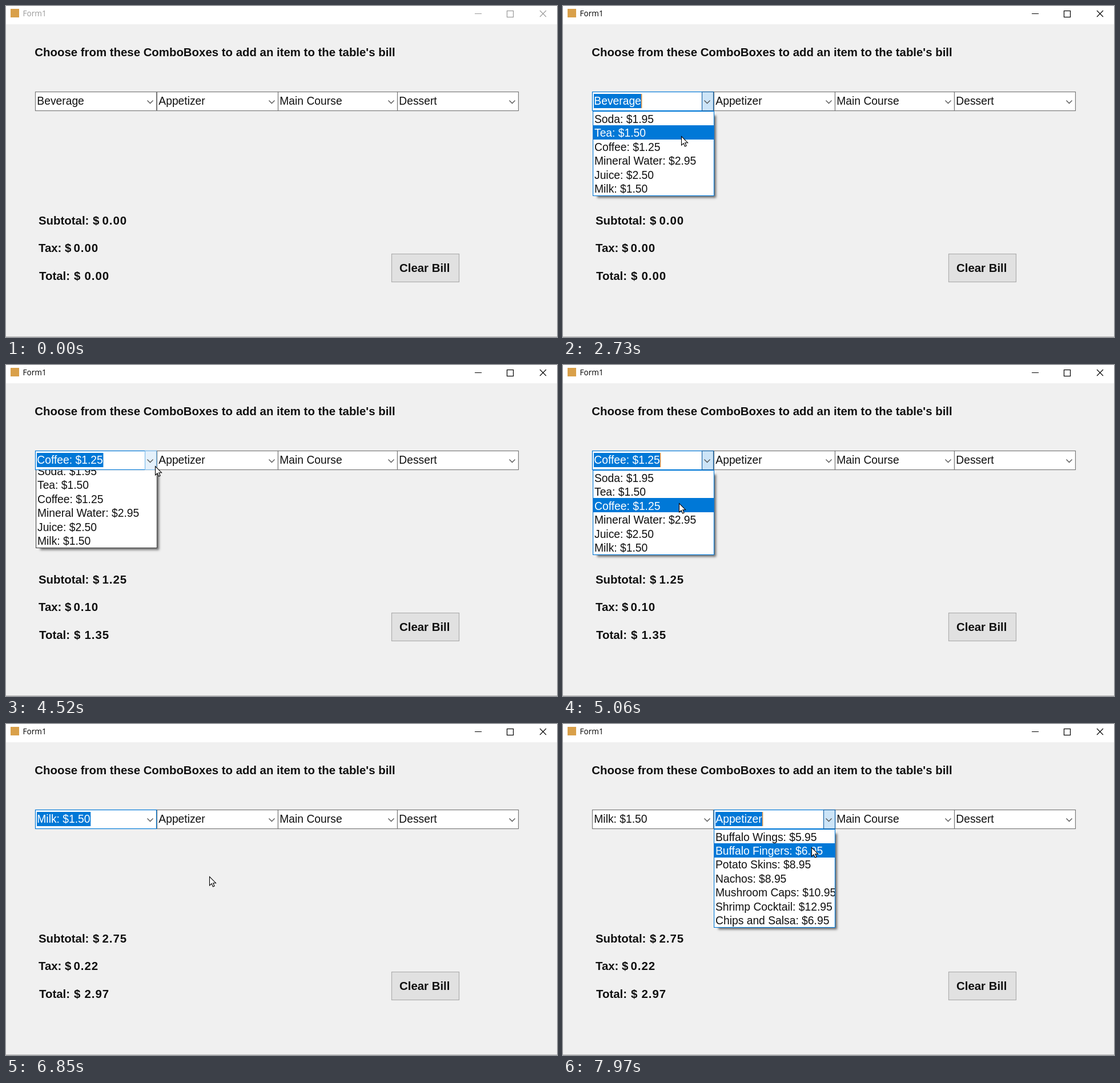
Animation, 965 px wide and 580 px high, one loop 8 s. Source, as an HTML page with a canvas:

```html
<!DOCTYPE html>
<html lang="en">
<head>
<meta charset="utf-8">
<title>Form1</title>
<style>
html, body { margin: 0; width: 100%; height: 100%; overflow: hidden; background: #f0f0f0; }
canvas { display: block; }
</style>
</head>
<body>
<canvas id="stage" width="965" height="580"></canvas>
<script>
const ctx = document.getElementById('stage').getContext('2d');
const LOOP = 8000, STEP = 70, TAX = 0.08;
const BLUE = '#0078d7', DARK = '#2b2b2b', GREY = '#7a7a7a', INK = '#101010';
const SANS = '"Liberation Sans", Arial, sans-serif';
const PLAIN = '19.3px ' + SANS, BOLD = 'bold 20.4px ' + SANS;
const TOP = 150, BOTTOM = 184, ROW = 24.4, LIST_TOP = 184;

const combos = [
  { x: 51, r: 264, label: 'Beverage', listX: 52,
    items: ['Soda: $1.95', 'Tea: $1.50', 'Coffee: $1.25', 'Mineral Water: $2.95', 'Juice: $2.50', 'Milk: $1.50'] },
  { x: 264, r: 477, label: 'Appetizer', listX: 264,
    items: ['Buffalo Wings: $5.95', 'Buffalo Fingers: $6.95', 'Potato Skins: $8.95', 'Nachos: $8.95',
      'Mushroom Caps: $10.95', 'Shrimp Cocktail: $12.95', 'Chips and Salsa: $6.95'] },
  { x: 476, r: 686, label: 'Main Course' },
  { x: 685, r: 898, label: 'Dessert' }
];

// Dropdown sessions: combo index, opening and closing time, preselected row, chosen row
const sessions = [
  { combo: 0, open: 1100, close: 3010, row: -1, pick: 2 },
  { combo: 0, open: 4380, close: 5690, row: 2, pick: 5 },
  { combo: 1, open: 7480, close: Infinity, row: -1 }
];

// Pointer legs: start, end, target x, target y
const legs = [
  [270, 970, 258, 177],
  [1640, 2200, 208, 224],
  [2730, 2930, 202, 243],
  [3080, 3490, 256, 196],
  [3560, 3630, 259, 200],
  [3700, 3770, 259, 191],
  [3970, 4250, 261, 177],
  [4810, 5060, 203, 242],
  [5140, 5560, 139, 316],
  [6170, 6450, 326, 293],
  [6650, 7410, 464, 172],
  [7690, 7970, 435, 216]
];

const caretOn = [[1640, 2170], [2730, 3630], [4230, 4410], [4810, 5340], [6170, 6680], [7480, 8000]];

const clamp = v => Math.max(0, Math.min(1, v));
const price = item => parseFloat(item.split('$')[1]);

function pointerAt(t) {
  let x = 8, y = 194;
  for (const [t0, t1, tx, ty] of legs) {
    if (t < t0) break;
    const raw = t >= t1 ? 1 : (Math.floor((t - t0) / STEP) + 1) * STEP / (t1 - t0 + STEP);
    const k = raw * 0.6 + raw * raw * (3 - 2 * raw) * 0.4;
    x += (tx - x) * k;
    y += (ty - y) * k;
  }
  return { x, y };
}

function rect(x, y, w, h, color) {
  ctx.fillStyle = color;
  ctx.fillRect(x, y, w, h);
}

function frame(x, y, r, b, color) {
  ctx.strokeStyle = color;
  ctx.lineWidth = 1.2;
  ctx.strokeRect(x + 0.5, y + 0.5, r - x - 1, b - y - 1);
}

function line(points, color, width) {
  ctx.beginPath();
  points.forEach(([x, y]) => ctx.lineTo(x, y));
  ctx.strokeStyle = color;
  ctx.lineWidth = width;
  ctx.stroke();
}

function text(str, x, y, font, color = INK, spacing = 0) {
  ctx.font = font;
  ctx.letterSpacing = spacing + 'px';
  ctx.fillStyle = color;
  ctx.fillText(str, x, y);
}

function drawTitleBar(active) {
  const c = active ? '#000' : '#999';
  rect(0, 0, 965, 32, '#fff');
  rect(8, 5, 15, 15, '#d9a04a');
  text('Form1', 29.5, 18, '13.6px "Open Sans", "Noto Sans", sans-serif', c);
  rect(821, 13, 12, 1, c);
  frame(877, 8, 889, 20, c);
  line([[935, 8], [946, 19]], c, 1.1);
  line([[946, 8], [935, 19]], c, 1.1);
}

function drawBill(subtotal) {
  const tax = Math.round(subtotal * TAX * 100) / 100;
  const rows = [
    ['Subtotal:', 57, 152, 169, 383, subtotal],
    ['Tax:', 57, 103, 119, 431, tax],
    ['Total:', 58, 119, 138, 480, subtotal + tax]
  ];
  for (const [label, x, dollarX, valueX, y, value] of rows) {
    text(label, x, y, BOLD);
    text('$', dollarX, y, BOLD);
    text(value.toFixed(2), valueX - 0.5, y, BOLD, INK, 1);
  }
}

function drawButton() {
  rect(675, 434, 118, 50, '#e1e1e1');
  frame(675, 434, 794, 484, '#adadad');
  text('Clear Bill', 689, 466, BOLD);
}

function drawArrowButton(c, fill, border, alpha) {
  ctx.globalAlpha = alpha;
  rect(c.r - 21, TOP, 21, BOTTOM - TOP, fill);
  frame(c.r - 21, TOP, c.r, BOTTOM, border);
  ctx.globalAlpha = 1;
}

function drawCombo(c, s) {
  rect(c.x, TOP, c.r - c.x, BOTTOM - TOP, '#fff');
  frame(c.x, TOP, c.r, BOTTOM, s.border);
  if (s.hover) drawArrowButton(c, '#e5f1fb', '#7fbcec', 1);
  if (s.press > 0) drawArrowButton(c, '#cce4f7', '#1a66a8', s.press);
  const m = c.r - 11.5;
  line([[m - 5, 165.5], [m, 170.5], [m + 5, 165.5]], '#505050', 1.3);
  ctx.font = PLAIN;
  ctx.letterSpacing = '0px';
  const w = ctx.measureText(s.label).width + 1;
  if (s.selected) rect(c.x + 3, 154, w, 25, BLUE);
  if (s.caret) rect(c.x + 2.5 + w, 154, 1.4, 25, '#ff9a3c');
  text(s.label, c.x + 3.3, 173, PLAIN, s.selected ? '#fff' : INK);
}

function drawList(c, part, row) {
  const x = c.listX, w = 213;
  const full = c.items.length * ROW + 2.4;
  const h = Math.round(full * part);
  ctx.save();
  ctx.shadowColor = 'rgba(0,0,0,.55)';
  ctx.shadowBlur = 4;
  ctx.shadowOffsetX = ctx.shadowOffsetY = 2.5;
  rect(x + 5, LIST_TOP + 5, w - 5, Math.max(0, h - 5), '#fff');
  ctx.restore();

  ctx.save();
  ctx.beginPath();
  ctx.rect(x, LIST_TOP, w, h);
  ctx.clip();
  const top = LIST_TOP + h - full;
  rect(x, LIST_TOP, w, h, '#fff');
  c.items.forEach((item, i) => {
    const y = top + 1.4 + i * ROW;
    if (i === row) rect(x + 1, Math.round(y - 1), w - 2, 25, BLUE);
    text(item, x + 3, Math.round(y + 19.3), PLAIN, i === row ? '#fff' : INK);
  });
  frame(x, part < 1 ? LIST_TOP - 1 : LIST_TOP, x + w, LIST_TOP + h, part < 1 ? '#444' : BLUE);
  ctx.restore();
}

function drawPointer({ x, y }) {
  const shape = [[0, 0], [0, 15.5], [3.6, 12.2], [6, 17.5], [8.6, 16.4], [6.2, 11.2], [11, 11.2]];
  ctx.beginPath();
  shape.forEach(([dx, dy]) => ctx.lineTo(x + 0.5 + dx, y + 0.5 + dy));
  ctx.closePath();
  ctx.fillStyle = '#fff';
  ctx.fill();
  ctx.strokeStyle = '#000';
  ctx.lineWidth = 1.1;
  ctx.stroke();
}

// The highlighted row follows the pointer and keeps its last value outside the list
function hoveredRow(session, t) {
  const c = combos[session.combo];
  let row = session.row;
  for (let u = session.open + 280; u <= t + STEP; u += STEP) {
    const p = pointerAt(Math.min(u, t));
    const i = Math.floor((p.y - LIST_TOP - 1) / ROW);
    if (i >= 0 && i < c.items.length && p.x > c.listX && p.x < c.listX + 213) row = i;
  }
  return row;
}

function draw(t) {
  const p = pointerAt(t);
  const visible = t >= 270;
  const current = sessions.find(s => t >= s.open && t < s.close);
  const part = current ? Math.min(1, 0.2 + 0.36 * Math.floor((t - current.open) / STEP)) : 0;
  const done = sessions.filter(s => t >= s.close);
  const chosen = done.map(s => combos[s.combo].items[s.pick]);
  const focus = t < 1100 ? -1 : t < 7480 ? 0 : 1;

  rect(0, 0, 965, 580, '#f0f0f0');
  drawTitleBar(t >= 1100);
  text("Choose from these ComboBoxes to add an item to the table's bill", 50.3, 88, BOLD);
  drawBill(chosen.reduce((sum, item) => sum + price(item), 0));
  drawButton();
  rect(0, 579, 965, 1, '#b4b4b4');

  const order = [3, 2, 0, 1];
  if (focus === 0) order.reverse();
  for (const i of order) {
    const c = combos[i];
    const over = visible && p.x >= c.x && p.x < c.r && p.y >= TOP && p.y < BOTTOM;
    const open = current && current.combo === i;
    const last = done[done.length - 1];
    const fading = last && last.combo === i && focus === i ? 1 - clamp((t - last.close - 150) / 180) : 0;
    const blue = i === 0 ? t >= 1310 && t < 7620 : i === 1 && t >= 7620;
    drawCombo(c, {
      label: i === 0 && chosen.length ? chosen[chosen.length - 1] : c.label,
      border: blue ? BLUE : over ? DARK : GREY,
      hover: over && p.x >= c.r - 21,
      press: open ? (part === 1 ? 1 : 0) : fading,
      selected: focus === i,
      caret: focus === i && caretOn.some(([a, b]) => t >= a && t < b)
    });
  }

  if (current) drawList(combos[current.combo], part, part < 1 ? -1 : hoveredRow(current, t));
  if (visible) drawPointer({ x: Math.round(p.x), y: Math.round(p.y) });
}

const start = performance.now();
function tick() {
  draw((performance.now() - start) % LOOP);
  requestAnimationFrame(tick);
}
tick();
</script>
</body>
</html>
```
